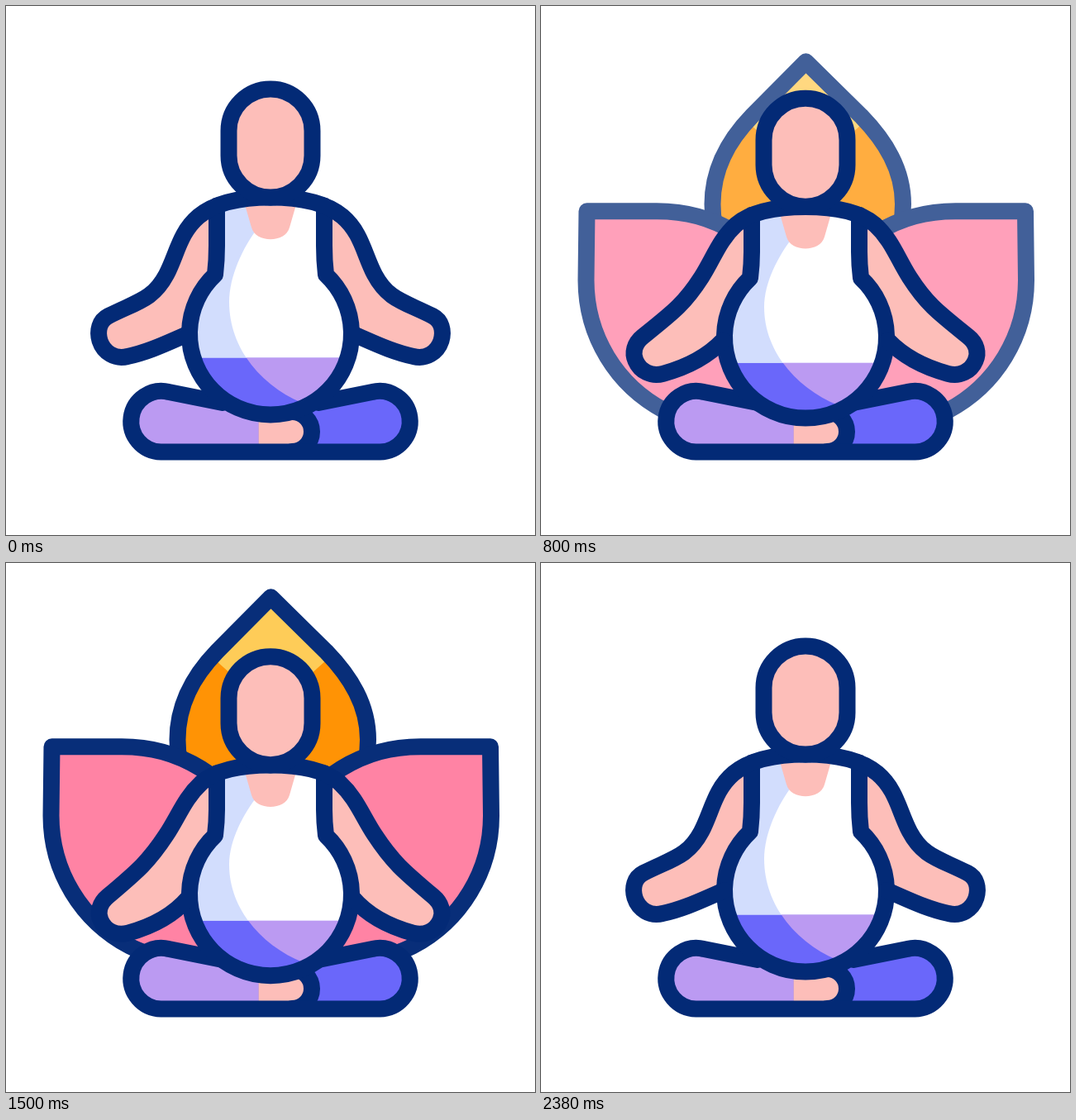
An HTML page with a canvas for the animation above (2.4 s loop, 640 px wide and 640 px high).

```html
<!DOCTYPE html>
<html lang="en">
<head>
<meta charset="utf-8">
<title>Meditation</title>
<style>
  html, body { margin: 0; width: 100%; height: 100%; overflow: hidden; background: #fff; }
  canvas { display: block; width: 640px; height: 640px; }
</style>
</head>
<body>
<canvas id="stage" width="640" height="640"></canvas>
<script>
const ctx = document.getElementById('stage').getContext('2d');
const LOOP = 2400;
const NAVY = '#032a76', SKIN = '#fdbeb9', LILAC = '#bb9af2', BLUE = '#6a67fa',
  SHADE = '#d2ddfd', ORANGE = '#ff9100', YELLOW = '#fecb55', PINK = '#ff80a2';

const PETAL = 'M320.5 49.5L255.5 115C225.5 146 207.5 180 207.5 222C207.5 300 270 340 322 360' +
  'C375 340 438 300 438 222C438 180 417 146 387 115Z';
const PETAL_TIP = 'M320.5 49L247 120L320.5 186L394 120Z';
const WING = 'M55.5 230.5H140C175 230.5 205 238 236 257C270 278 300 310 320 350V500' +
  'C270 500 215 495 200 489C180 484 165 480 150 472C91 441 54.5 381 54.5 314Z';
const LEGS = 'M262 480L197 467A36.8 36.8 0 1 0 187.5 539.5H452.5A36.8 36.8 0 1 0 443 467L378 480';
const FOOT = 'M305.5 491H346A24 24 0 0 1 346 539H305.5Z';
const FOOT_LINE = 'M346 491A24 24 0 0 1 346 539';

// Each moving outline is a pair: breathed in, breathed out
const ARM = [
  'M320 231.5C287 231.5 254 237 233 254.5C210 274 207 300 194 325C178 355 160 357 124 375' +
  'C113 380.5 110 393 113.5 405C118 419 132 428 147 424C175 418 198 406 222 396',
  'M320 247C287 247 255 252 237 268C217 287 210 306 194 329.5C172 362 160 375 123 408.5' +
  'C113 417.5 110 429 115 438C120.5 450 134 456 148 452C180 443 204 429 220 407'];
const TORSO = [
  'M255 241.5V290Q255 308 253 325A98 98 0 1 0 387 325Q385 308 385 290V241.5',
  'M255 256.5V300Q255 314 253 330.5A98 98 0 1 0 387 330.5Q385 314 385 300V256.5'];
const LIT_SIDE = [
  'M305 268C287 291 270 327 270 358C270 415 310 460 358 480L460 480V220H305Z',
  'M305 283C287 306 270 337 270 366C270 421 312 465 360 484L460 484V235H305Z'];

const clamp = x => Math.min(1, Math.max(0, x));
const ease = (t, from, to) => {
  const s = clamp((t - from) / (to - from));
  return s * s * (3 - 2 * s);
};

function blend([a, b], k) {
  const ends = b.match(/[\d.]+/g);
  let i = 0;
  return a.replace(/[\d.]+/g, n => +n + (ends[i++] - n) * k);
}

function draw(path, fill, stroke) {
  const shape = new Path2D(path);
  if (fill) { ctx.fillStyle = fill; ctx.fill(shape); }
  if (stroke) { ctx.strokeStyle = stroke; ctx.stroke(shape); }
}

function bothSides(axis, paint) {
  paint();
  ctx.save();
  ctx.translate(2 * axis, 0);
  ctx.scale(-1, 1);
  paint();
  ctx.restore();
}

function drawFlower(t) {
  const opacity = ease(t, 110, 1135) * (1 - ease(t, 1445, 2127));
  if (!opacity) return;
  ctx.save();
  ctx.translate(0, (1280 - t) * 0.0372);
  draw(PETAL, ORANGE);
  draw(PETAL_TIP, YELLOW);
  draw(PETAL, null, NAVY);
  bothSides(320.75, () => draw(WING, PINK, NAVY));
  ctx.restore();
  // A white veil fades the flower as one layer
  ctx.fillStyle = `rgba(255,255,255,${1 - opacity})`;
  ctx.fillRect(0, 0, 640, 640);
}

function drawLegs() {
  draw(LEGS, BLUE);
  ctx.save();
  ctx.clip(new Path2D(LEGS));
  ctx.fillStyle = LILAC;
  ctx.fillRect(140, 450, 165.5, 100);
  ctx.restore();
  draw(FOOT, SKIN);
  draw(FOOT_LINE, null, NAVY);
  draw(LEGS, null, NAVY);
}

function drawTorso(k) {
  const torso = blend(TORSO, k), lit = blend(LIT_SIDE, k);
  const waist = 425.5 + 8.5 * k;
  const fillBand = (y, height, dark, light) => {
    ctx.save();
    ctx.beginPath();
    ctx.rect(200, y, 240, height);
    ctx.clip();
    ctx.fillStyle = dark;
    ctx.fillRect(200, y, 240, height);
    draw(lit, light);
    ctx.restore();
  };
  ctx.save();
  ctx.clip(new Path2D(torso));
  fillBand(200, 300, SHADE, '#fff');
  fillBand(waist, 100, BLUE, LILAC);
  ctx.translate(0, 15 * k);
  draw('M286 230L297 268C302 287 338 287 343 268L354 230Z', SKIN);
  ctx.restore();
  draw(torso, null, NAVY);
}

function drawHead(k) {
  ctx.beginPath();
  ctx.roundRect(269.5, 100.5 + 15 * k, 101, 131, 50.5);
  ctx.fillStyle = SKIN;
  ctx.fill();
  ctx.strokeStyle = NAVY;
  ctx.stroke();
}

function frame() {
  const t = performance.now() % LOOP;
  const breath = ease(t < 1200 ? t : LOOP - t, 0, 1200);
  ctx.fillStyle = '#fff';
  ctx.fillRect(0, 0, 640, 640);
  ctx.lineWidth = 20;
  ctx.lineCap = ctx.lineJoin = 'round';
  drawFlower(t);
  drawLegs();
  const arm = blend(ARM, breath);
  bothSides(320, () => draw(arm, SKIN));
  drawTorso(breath);
  bothSides(320, () => draw(arm, null, NAVY));
  drawHead(breath);
  requestAnimationFrame(frame);
}
frame();
</script>
</body>
</html>
```
